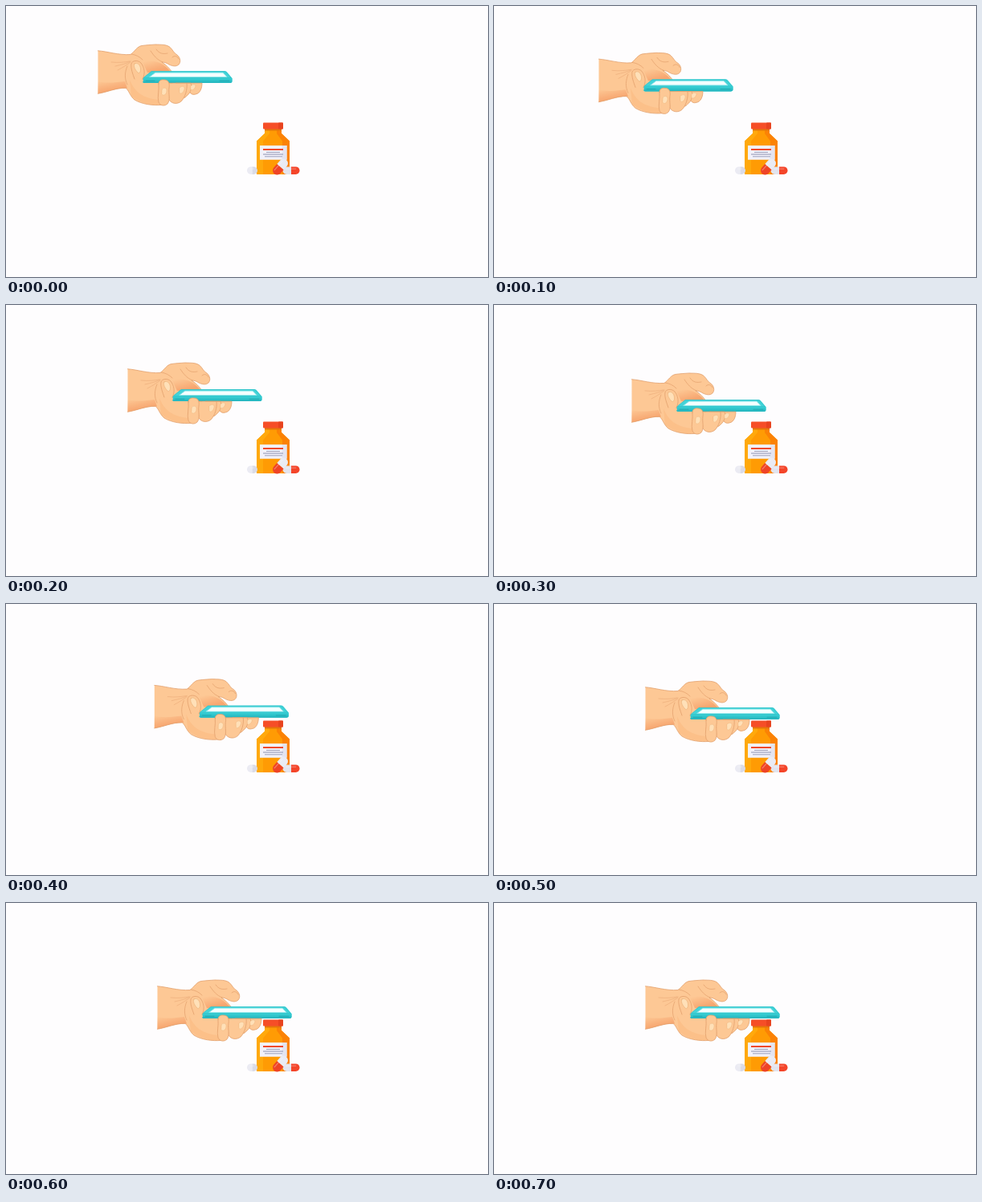
Recreate the animation shown at these times as an HTML page with a canvas. Size 600x338 px, loop 800 ms.

```html
<!DOCTYPE html>
<html lang="en">
<head>
<meta charset="utf-8">
<style>
html, body { margin: 0; width: 100%; height: 100%; overflow: hidden; background: #fefdfe; }
canvas { display: block; }
</style>
</head>
<body>
<canvas id="stage" width="600" height="338"></canvas>
<script>
const ctx = document.getElementById('stage').getContext('2d');
const SKIN = '#fdc895', LINE = '#e3a06c', SHADE = '#f7a670', NAIL = '#ffe0b8';
const LOOP = 800, STEP = 100;
const TRAVEL = { x: 74, y: 48 };
const PROGRESS = [0, 0.216, 0.5, 0.77, 0.95, 1, 1, 1];

function shape(d, fill, stroke, width = 0.8) {
  const p = new Path2D(d);
  if (fill) { ctx.fillStyle = fill; ctx.fill(p); }
  if (stroke) { ctx.strokeStyle = stroke; ctx.lineWidth = width; ctx.stroke(p); }
}

function rect(x, y, w, h, fill, r = 0) {
  ctx.fillStyle = fill;
  ctx.beginPath();
  ctx.roundRect(x, y, w, h, r);
  ctx.fill();
}

function ramp(x0, y0, x1, y1, ...colors) {
  const g = ctx.createLinearGradient(x0, y0, x1, y1);
  colors.forEach((c, i) => g.addColorStop(i / (colors.length - 1), c));
  return g;
}

function capsule(x, y, w, h, angle, left, right) {
  ctx.save();
  ctx.translate(x, y);
  ctx.rotate(angle);
  rect(-w / 2, -h / 2, w / 2, h, left, [h / 2, 0, 0, h / 2]);
  rect(0, -h / 2, w / 2, h, right, [0, h / 2, h / 2, 0]);
  rect(-w / 2 + 3, -h / 2 + 2, w - 7, 1.4, 'rgba(255,255,255,.3)', 0.7);
  ctx.restore();
}

function drawBottle() {
  shape('M322 153H343V159L353 168.5V210H312V168.5L322 159Z', '#ff9b04');
  shape('M322 153H328V159L320 168.5V210H312V168.5L322 159Z', '#ffa90c');
  shape('M337 153H343V159L353 168.5V210H344V168.5L337 159Z', '#fb8204');
  rect(322, 153, 21, 2.5, '#e5760a');
  rect(320, 145.5, 25, 8, '#f64e27', 1);
  rect(339, 145.5, 6, 8, '#e8431f', 1);
  rect(316, 174, 33.5, 17.8, '#f2f1fa');
  rect(343.5, 174, 6, 17.8, '#e4e4f0');
  rect(320, 178, 25, 2, '#f04a2c');
  rect(324, 181.9, 17, 1, '#9aa0ba');
  rect(320, 184.5, 25, 1, '#8a90ae');
  rect(322, 187.3, 22, 1, '#9aa0ba');
  capsule(306.5, 205.2, 13, 9.6, 0, '#ebebf3', '#dadbe7');
  capsule(355, 205.2, 21, 9.6, 0, '#e3e4ee', '#f4452a');
  capsule(341.5, 200.6, 23, 11, -0.85, '#ef4426', '#eaebf4');
}

function drawPalm() {
  const outline = 'C126 56.5 140 61.5 155 60.5C160 57 163 50.5 169 49.5C176 48.5 180 48.5 186 48C193 48.4 199 47.6 204 51.3C208 55 209 59 213 61C217 64 218 70 215 73C212 76 207 75 203 73C200 71 197 70 194 70C200 74 204 78 207 83V96L194 123.3C183 124.5 169 122.5 160 117C154 112 153 105 149 102.3C137 102 126 107.5 114.5 109.3';
  shape('M114.5 55.8' + outline + 'Z', SKIN);
  shape('M114.5 94C126 97 138 95 148 94L151 102.5C137 102 126 107.5 114.5 109.3Z',
    ramp(118, 93, 121, 108, 'rgba(247,166,112,0)', SHADE));
  shape('M170 70C184 66 195 70 206 83H176Z', ramp(185, 66, 189, 81, SKIN, SHADE));
  shape('M154 92C160 107 170 115 190 117L192 123C176 124 164 119 156 112Z', 'rgba(247,171,110,.3)');
  shape('M114.5 55.8' + outline, null, LINE, 0.8);
  // creases
  shape('M131 70C140 71 148 70 154 69M136 75C144 73 150 72 155 69M139 80C145 77 151 73 155 70', null, '#edae7c', 0.7);
  shape('M180 56C184 62 188 67 195 70M187 54C191 60 196 60 201 59M207 64C210 61 214 63 215 66', null, LINE, 0.7);
  shape('M151 75C148 82 147 90 151 98M156 60C162 61 166 63 170 67', null, LINE, 0.7);
}

function drawPhone() {
  shape('M181 81.2L272 81Q274 81 275 82.2L281.5 90V94.3Q281.5 96 279 96.1H173Q170 96.2 170 93.3V90.5Z', '#43d3d8');
  shape('M170 90H281.5V94Q281.5 96.1 279 96.1H173Q170 96.2 170 93.5Z', ramp(0, 90, 0, 96, '#38d0d5', '#23b4bd'));
  shape('M181.5 81.6H272.5L280.5 89.6H171.2Z', null, '#2fc0c7', 0.7);
  shape('M186 83.2H270L275 88.5H179Z', '#f4ffff', '#93e8eb', 0.7);
  shape('M174 93.3H185M266 93.3H278', null, '#1d9fa9', 0.7);
}

function drawFingers() {
  // thumb
  shape('M158 69C153 71 156 81 159 88C162 94 167 96 171 94L170 90C174 84 172 76 169 72C166 68 161 67 158 69Z', SKIN);
  shape('M170 91C174 84 172 76 168 71C164 67 157 68 156 72C155 78 158 85 160 91', null, LINE, 0.8);
  shape('M160 72C163 70 167 73 167.5 78C168 82 166 85 164 83C161 80 158 75 160 72Z', NAIL, '#e7ad74', 0.6);
  // far to near
  shape('M226 96.2H244C244 102 242 109 236 110C230 112 226 106 226 96.2Z', SKIN, LINE);
  shape('M212 96.2H230C232 100 230 109 225 112C221 118 210 116 212 96.2Z', SKIN, LINE);
  shape('M202 96.2H225C226 104 223 114 218 119C213 123 206 122 203 117Z', SKIN, LINE);
  shape('M190 97C190 93 193 91.5 197 92C202 92 204 96 203 102C202 109 205 117 201 122C198 125 192 125 190 120C188 113 191 105 190 97Z', SKIN, LINE);
  shape('M194 105C194 101 201 101 200 106C200 110 196 113 194 110Z', NAIL, '#edb57c', 0.5);
  shape('M216 102C219 99 223 100 222 104C221 108 217 111 216 108Z', NAIL, '#edb57c', 0.5);
  shape('M230 100C232 97 236 97 236 100C235 104 231 106 230 104Z', NAIL, '#edb57c', 0.5);
}

function draw(now) {
  const p = PROGRESS[Math.floor((now % LOOP) / STEP)];
  ctx.fillStyle = '#fefdfe';
  ctx.fillRect(0, 0, 600, 338);
  ctx.lineCap = ctx.lineJoin = 'round';
  drawBottle();
  ctx.save();
  ctx.translate(TRAVEL.x * p, TRAVEL.y * p);
  drawPalm();
  drawPhone();
  drawFingers();
  ctx.restore();
}

const start = performance.now();
function tick() {
  draw(performance.now() - start);
  requestAnimationFrame(tick);
}
tick();
</script>
</body>
</html>
```
